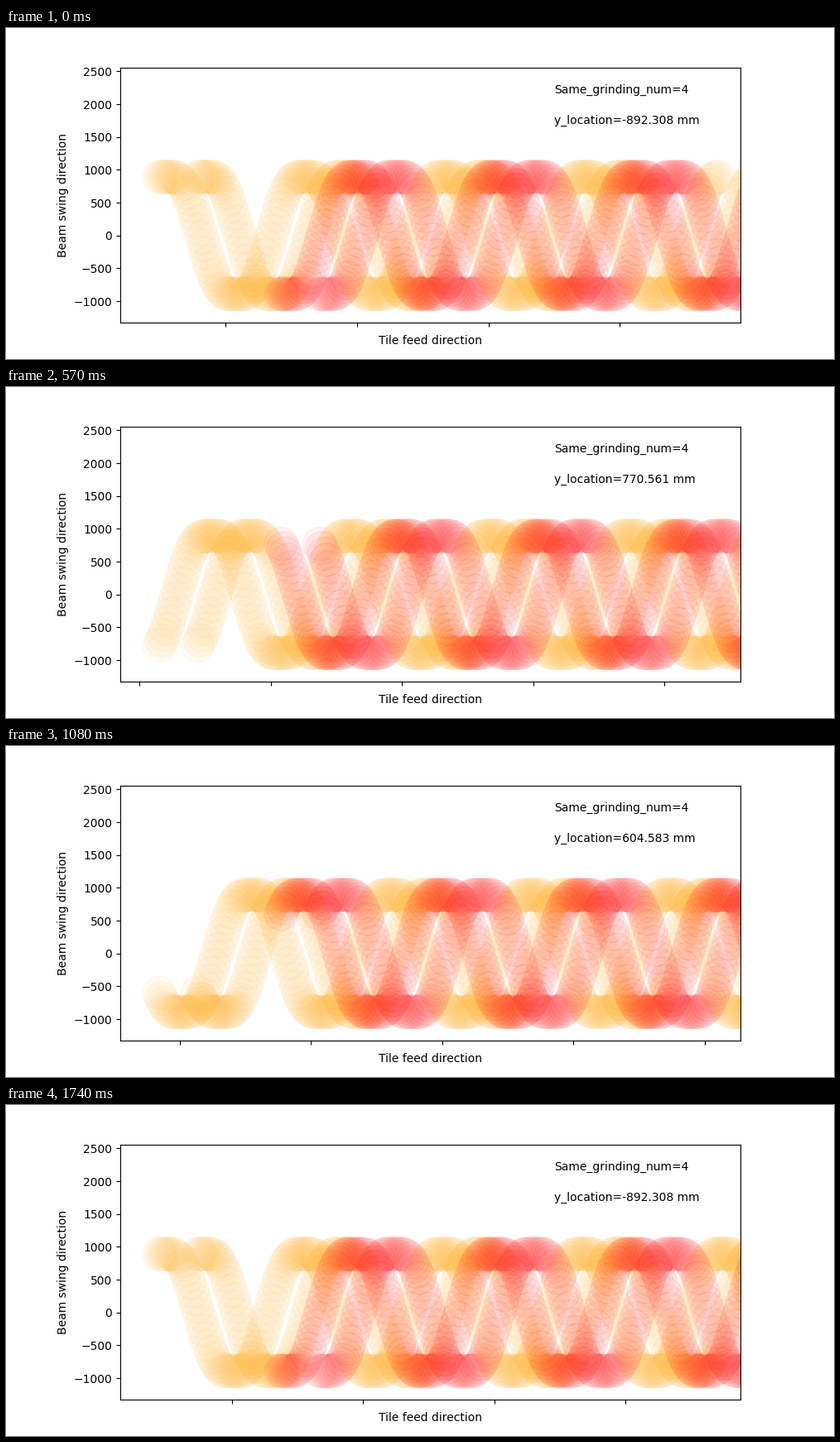
These frames come from a looping animation (1000 px wide and 400 px high, 1770 ms). A matplotlib script:

```python
import math

import matplotlib.pyplot as plt
from matplotlib.animation import FuncAnimation
from matplotlib.collections import PathCollection
from matplotlib.path import Path
from matplotlib.ticker import MultipleLocator, NullFormatter

FRAMES, INTERVAL = 59, 30
W, H = 1000, 400
LEFT, RIGHT, TOP, BOTTOM = 138.02, 887.02, 48, 356   # axes box in pixels
SCALE = 0.0793                                       # pixels per mm
ZERO_Y = 250.7                                       # pixel row of y = 0

# Beam swing: speed up, cruise, slow down, then dwell
LOW, HIGH = -892.308, 891.692
STROKE = HIGH - LOW
ACCEL, MOVE, RETURN_AT = 14.625, 23.07, 29.734
RAMP = (MOVE - math.sqrt(MOVE ** 2 - 4 * STROKE / ACCEL)) / 2

BELT = 36.05          # mm of feed per frame
RADIUS = 255
HISTORY = 4 * FRAMES  # steps already ground when the loop starts


def travel(t):
    """Distance covered t frames after a stroke begins."""
    t = min(max(t, 0), MOVE)
    if t < RAMP:
        return ACCEL * t * t / 2
    if t < MOVE - RAMP:
        return ACCEL * RAMP * (t - RAMP / 2)
    return STROKE - ACCEL * (MOVE - t) ** 2 / 2


def swing(n):
    n %= FRAMES
    return LOW + travel(n) - travel(n - RETURN_AT)


def view_left(n):
    return -(265.3 - LEFT) / SCALE - BELT * n


def trail(heads, sign):
    """Discs left on the belt by a pair of heads, oldest first."""
    return [
        Path.circle((view_left(n) + (px - LEFT) / SCALE, sign * swing(n)), RADIUS)
        for n in range(-HISTORY, FRAMES)
        for px in heads
    ]


fig = plt.figure(figsize=(W / 100, H / 100), dpi=100, facecolor="white")
ax = fig.add_axes([LEFT / W, 1 - BOTTOM / H, (RIGHT - LEFT) / W, (BOTTOM - TOP) / H])
ax.set_ylim((ZERO_Y - BOTTOM) / SCALE, (ZERO_Y - TOP) / SCALE)
ax.yaxis.set_major_locator(MultipleLocator(500))
ax.xaxis.set_major_locator(MultipleLocator(2000))
ax.xaxis.set_major_formatter(NullFormatter())
ax.set_xlabel("Tile feed direction")
ax.set_ylabel("Beam swing direction")
ax.text(0.7, 0.9, "Same_grinding_num=4", transform=ax.transAxes)
readout = ax.text(0.7, 0.78, "", transform=ax.transAxes)

layers = []
for color, heads, sign in (("orange", (185, 231.5), -1), ("red", (332, 378.5), 1)):
    discs = PathCollection([], facecolor=color, edgecolor=color,
                           linewidth=1, alpha=0.05)
    ax.add_collection(discs, autolim=False)
    layers.append((discs, trail(heads, sign)))


def draw(n):
    left = view_left(n)
    right = left + (RIGHT - LEFT) / SCALE
    ax.set_xlim(left, right)
    for discs, paths in layers:
        laid = paths[:2 * (HISTORY + n + 1)]
        discs.set_paths([p for p in laid if p.vertices[:, 0].min() < right + 50])
    readout.set_text(f"y_location={swing(n):.3f} mm")
    return [readout]


anim = FuncAnimation(fig, draw, frames=FRAMES, interval=INTERVAL,
                     repeat=True, repeat_delay=0, blit=False)
plt.show()
```
